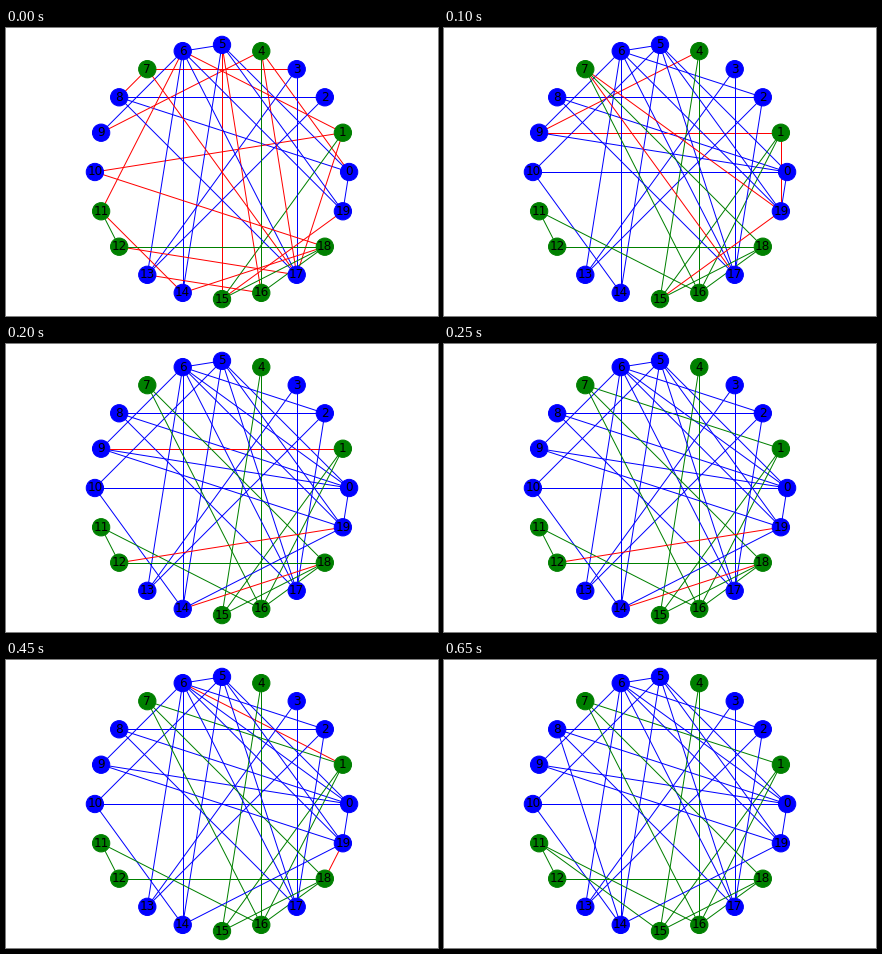
These frames come from a looping animation (432x288 px, 0.7 s). A matplotlib script:

```python
from itertools import pairwise

import numpy as np
import matplotlib.pyplot as plt
from matplotlib.animation import FuncAnimation
from matplotlib.collections import LineCollection

W, H, DPI = 432, 288, 72
COUNT, RADIUS = 20, 127.1
STEPS, STEP_MS, REST = 14, 50, 6
GREEN = {1, 4, 7, 11, 12, 15, 16, 18}

# Walks through the network; each pair of neighbours is a link, oldest first
START = [
    [17, 4, 0, 5, 16, 13, 3, 7, 8, 2, 13, 6, 5, 15, 1, 6, 19, 5, 14, 6, 11, 12, 18],
    [12, 17, 1, 10, 18, 14, 11],
    [7, 17, 6, 9, 4, 16, 18, 15, 19, 0, 8, 17, 3],
]
ADDED = [
    [18, 7, 19, 1, 9, 0, 10, 5, 17, 2, 6],
    [10, 14], [4, 15], [7, 16, 11], [1, 16],
    [9, 19, 12], [19, 14, 18], [0, 6], [7, 1, 8],
    [18, 19], [1, 6], [11, 15], [6, 12], [8, 14],
]


def links_of(walks):
    return [tuple(sorted(pair)) for walk in walks for pair in pairwise(walk)]


def node_color(n):
    return "green" if n in GREEN else "blue"


def link_color(u, v):
    return node_color(u) if node_color(u) == node_color(v) else "red"


def network(step):
    """Each step rewires the older half of the red links, with regular rests."""
    links, added = links_of(START), iter(links_of(ADDED))
    for k in range(1, step + 1):
        if k % REST == 0:
            continue
        red = [e for e in links if link_color(*e) == "red"]
        for old in red[:max(1, len(red) // 2)]:
            links.remove(old)
            links.append(next(added))
    return sorted(links)


angle = 2 * np.pi * np.arange(COUNT) / COUNT
pos = np.column_stack([W / 2 + RADIUS * np.cos(angle),
                       H / 2 + RADIUS * np.sin(angle)])

fig = plt.figure(figsize=(W / DPI, H / DPI), dpi=DPI, facecolor="white")
ax = fig.add_axes([0, 0, 1, 1])
ax.set(xlim=(0, W), ylim=(0, H))
ax.axis("off")

lines = ax.add_collection(LineCollection([], linewidths=1, zorder=1))
ax.scatter(pos[:, 0], pos[:, 1], s=300, zorder=2,
           c=[node_color(n) for n in range(COUNT)])
for n, (x, y) in enumerate(pos):
    # A hair above centre, so rounding lifts the labels on the midline
    ax.text(x, y + 0.02, str(n), fontsize=12, family="DejaVu Sans",
            ha="center", va="center", zorder=3)


def draw(step):
    links = network(step)
    lines.set_segments([pos[list(e)] for e in links])
    lines.set_color([link_color(*e) for e in links])
    return [lines]


anim = FuncAnimation(fig, draw, frames=STEPS, interval=STEP_MS,
                     repeat=True, repeat_delay=0, blit=False)
plt.show()
```
